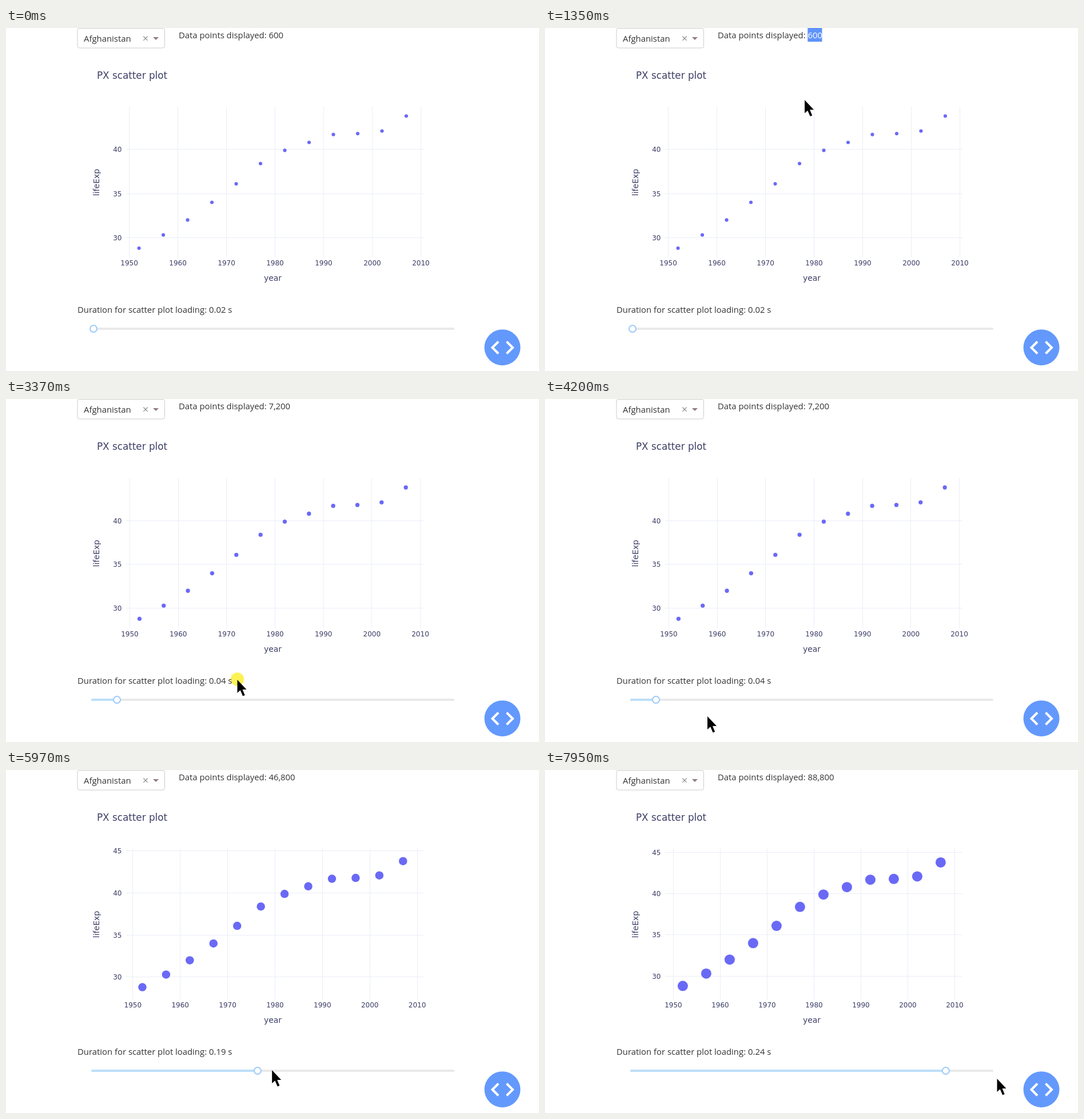
Recreate the animation shown at these times as an HTML page. Size 932x601 px, loop 8 s.

```html
<!DOCTYPE html>
<html lang="en">
<head>
<meta charset="utf-8">
<title>Scatter plot loading</title>
<style>
  html, body { margin: 0; width: 100%; height: 100%; overflow: hidden; background: #fff; }
  svg { display: block; width: 932px; height: 601px; }
  .ui { font: 14.87px "Open Sans", "Noto Sans", sans-serif; fill: #333; }
  .plot { font: 12px "DejaVu Sans", sans-serif; fill: #3d3f66; }
  .grid { stroke: #ebeef9; stroke-width: 1; fill: none; }
  #dots { fill: #6a69f6; }
</style>
</head>
<body>
<svg viewBox="0 0 932 601">
  <g class="ui">
    <rect x="125" y=".5" width="152.5" height="34.5" rx="3.5" fill="#fff" stroke="#ccc"/>
    <text x="136" y="24">Afghanistan</text>
    <path d="M240.3 14.5l7.4 7.4m0-7.4l-7.4 7.4" stroke="#909090" stroke-width="1.3"/>
    <path d="M257 16h10l-5 5z" fill="#947a83"/>
    <rect id="sel" y="0" height="24" fill="#5f93fb"/>
    <text x="302" y="18">Data points displayed: <tspan id="count"></tspan><tspan id="marked" fill="#fff"></tspan></text>
    <text x="125" y="499">Duration for scatter plot loading: <tspan id="dur"></tspan> s</text>
  </g>

  <g class="plot">
    <text x="159" y="88.5" font-size="16.8">PX scatter plot</text>
    <text x="466.5" y="443" font-size="14" text-anchor="middle">year</text>
    <text transform="translate(163 270.5) rotate(-90)" font-size="14" text-anchor="middle">lifeExp</text>
    <path id="grid" class="grid"/>
    <g id="xTicks" text-anchor="middle"></g>
    <g id="yTicks" text-anchor="end"></g>
    <g id="dots"></g>
  </g>

  <rect x="149" y="525" width="635" height="4" rx="2" fill="#e9e9e9"/>
  <rect id="track" x="149" y="525" height="4" rx="2" fill="#bcdff8"/>
  <circle id="knob" cy="527" r="6" fill="#fff" stroke="#9ccbfa" stroke-width="2"/>

  <circle cx="868" cy="559.7" r="31.5" fill="#6399fc"/>
  <path d="M861 549.5l-10.5 10.5L861 570.5M875.5 549.5L886 560l-10.5 10.5" fill="none" stroke="#fff" stroke-width="4"/>

  <circle id="halo" r="11.7" fill="#fbf256" style="mix-blend-mode:multiply"/>
  <g id="cursor">
    <path id="arrow" d="M0 0V23L5.2 18.3 9.6 28.5 13.2 27 9 17H16z" fill="#000"/>
    <path id="cross" d="M-12 0H12M0-12V12" stroke="#000" stroke-width="1.2"/>
    <path id="beam" d="M-4-9H4M0-9V9M-4 9H4" stroke="#000" stroke-width="1.3"/>
    <path id="hand" d="M-4 9.5L-5 6-9 1C-10-1-7-2-6 0L-4 2-6-5C-6.5-7-4-8-3.3-6L-2-2V-8C-2-10 .8-10 .8-8L1-2 2-7.5C2.5-9.5 5-9 4.7-7L4-1 6-5C7-6.7 9.3-5.6 8.6-3.7L6 5 5.5 9.5z" fill="#fff59a" stroke="#222" stroke-width="1.2" stroke-linejoin="round"/>
  </g>
</svg>
<script>
const LOOP = 8000, HOLD = 240, LAG = 60, PICK = 890;
const el = id => document.getElementById(id);
const set = (node, attrs) => { for (const k in attrs) node.setAttribute(k, attrs[k]); };
const show = (node, on) => { node.style.display = on ? "" : "none"; };
const crisp = v => Math.round(v - .5) + .5;
const clamp = (v, lo, hi) => Math.min(hi, Math.max(lo, v));
const make = (parent, tag, n) => Array.from({ length: n }, () =>
  el(parent).appendChild(document.createElementNS("http://www.w3.org/2000/svg", tag)));

const lifeExp = [28.8, 30.3, 32, 34, 36.1, 38.4, 39.9, 40.8, 41.7, 41.8, 42.1, 43.8];

// slider clicks; the plot follows the handle once it is ready
const clicks = [
  { press: -LOOP, ready: 0, points: 600, secs: .02 },
  { press: 2310, ready: 2640, points: 7200, secs: .04 },
  { press: 4670, ready: 4930, points: 20400, secs: .1 },
  { press: 5660, ready: 5970, points: 46800, secs: .19 },
  { press: 6590, ready: 6800, points: 66000, secs: .24 },
  { press: 7550, ready: LOOP, points: 88800 }
];
const presses = [810, 3370, ...clicks.map(c => c.press)];

// cursor moves: [start, end, x, y]
const home = [827, 519];
const moves = [
  [70, 420, 571, 200], [420, 810, 486, 12], [PICK, 1140, 460, 12], [1200, 1350, 455, 125],
  [1350, 1560, 258, 412], [1560, 2040, 193, 522], [2640, 3200, 404.5, 492], [3440, 4130, 284, 556],
  [4250, 4600, 276, 526], [4910, 4930, 285, 521.5], [4930, 5360, 440, 526], [5910, 5970, 465, 526],
  [5970, 6550, 559, 526], [6800, 7210, 701, 525], [7880, 7950, 790.5, 541]
];

const last = (list, test) => list.filter(test).pop();

function place(t) {
  let [x, y] = home;
  for (const [a, b, tx, ty] of moves) {
    const f = clamp((t - a) / (b - a), 0, 1);
    x += (tx - x) * f;
    y += (ty - y) * f;
  }
  return [x, y];
}

const dots = make("dots", "circle", lifeExp.length);
const xTicks = make("xTicks", "text", 7);
const yTicks = make("yTicks", "text", 4);
xTicks.forEach((node, i) => { node.textContent = 1950 + 10 * i; });
yTicks.forEach((node, i) => { node.textContent = 30 + 5 * i; });

function drawPlot(points) {
  // larger markers widen the axis ranges
  const grow = points / 11000, r = 3 + grow;
  const px = year => 470.5 + (year - 1980) * (8.5 - .05 * grow);
  const py = v => 290.1 - .2 * grow - (v - 35) * (15.45 - .17 * grow);
  let d = "";
  xTicks.forEach((node, i) => {
    const x = px(1950 + 10 * i);
    set(node, { x, y: 415.5 });
    d += `M${crisp(x)} 138V402`;
  });
  yTicks.forEach((node, i) => {
    const y = py(30 + 5 * i), on = y > 137;
    set(node, { x: 202.5, y: y + 4.5 });
    show(node, on);
    if (on) d += `M210 ${crisp(y)}H730`;
  });
  set(el("grid"), { d });
  dots.forEach((node, i) => set(node, { cx: px(1952 + 5 * i), cy: py(lifeExp[i]), r }));
}

function drawText(t, points, secs) {
  el("dur").textContent = secs;
  const text = points.toLocaleString("en-US");
  const picked = points === 600 && t >= PICK ? clamp(Math.ceil((t - PICK + 1) / 90), 1, 3) : 0;
  const cut = text.length - picked;
  el("count").textContent = text.slice(0, cut);
  el("marked").textContent = text.slice(cut);
  set(el("sel"), { x: 484.5 - 8.4 * picked, width: 8.4 * picked });
}

function drawCursor(t) {
  const [x, y] = place(t);
  const pressed = presses.some(p => t >= p && t < p + HOLD);
  const inPlot = x > 210 && x < 730 && y > 138 && y < 402;
  const kind = pressed && y > 510 ? "hand" : inPlot ? "cross" : y < 24 ? "beam" : "arrow";
  for (const id of ["arrow", "cross", "beam", "hand"]) show(el(id), id === kind);
  show(el("cursor"), t >= moves[0][0]);
  show(el("halo"), pressed);
  set(el("cursor"), { transform: `translate(${x} ${y})` });
  set(el("halo"), { cx: x, cy: y - (kind === "arrow") });
}

function render(t) {
  const plotted = last(clicks, c => c.ready <= t);
  const { points } = last(clicks, c => c.press + LAG <= t);
  const x = 149.3 + points * .00621;
  drawPlot(plotted.points);
  drawText(t, points, plotted.secs);
  set(el("knob"), { cx: x });
  set(el("track"), { width: x - 149 });
  drawCursor(t);
}

function tick() {
  render(performance.now() % LOOP);
  requestAnimationFrame(tick);
}
tick();
</script>
</body>
</html>
```
